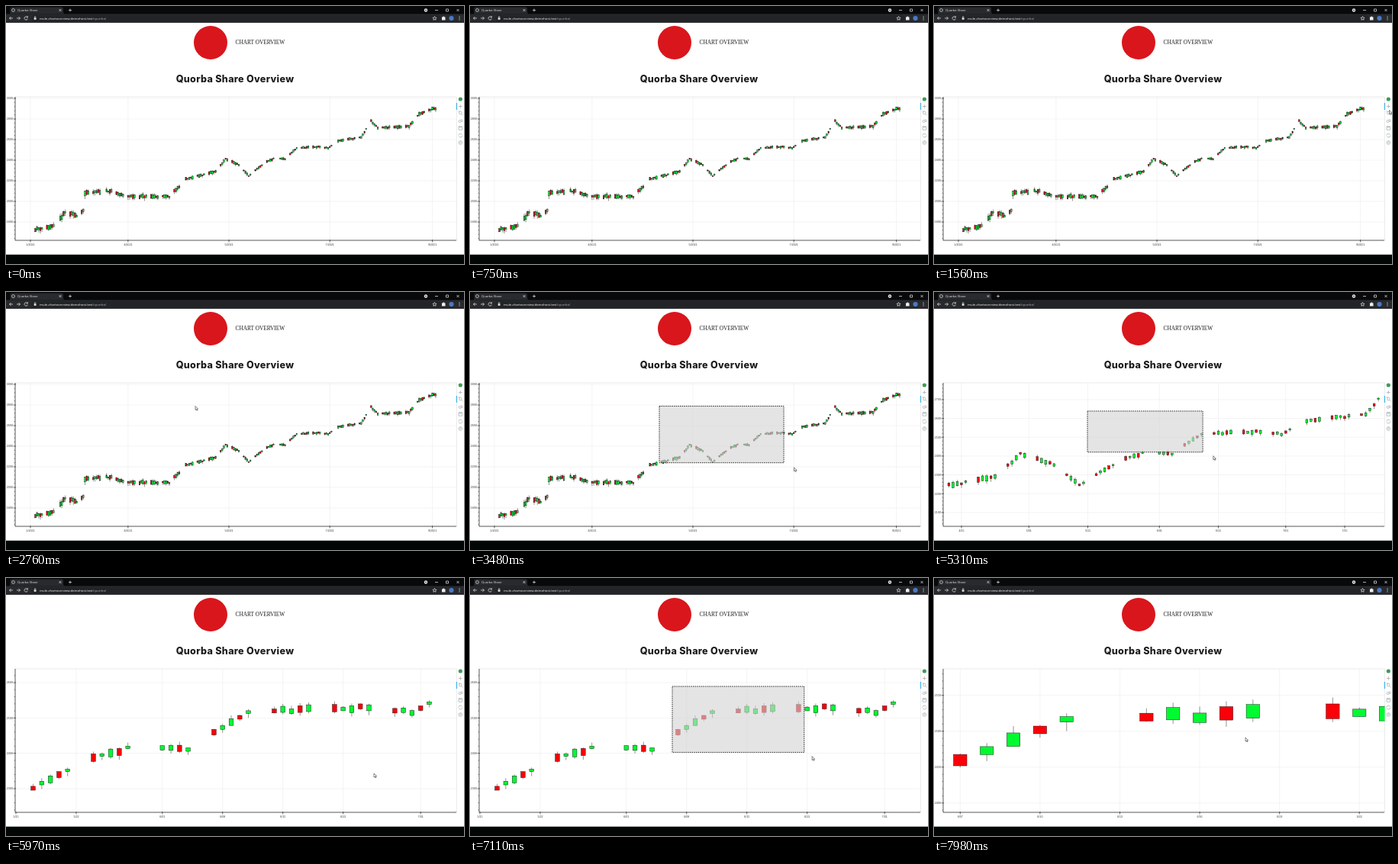
These frames come from a looping animation (600 px wide and 338 px high, 8000 ms). An HTML page:

```html
<!DOCTYPE html>
<html lang="en">
<head>
<meta charset="utf-8">
<title>Quorba Share</title>
<style>
html, body { margin: 0; width: 100%; height: 100%; overflow: hidden; background: #fff; }
svg { display: block; width: 100%; height: 100%; }
text { font-family: "Open Sans", Roboto, sans-serif; }
.tick { font: 3.7px "Liberation Sans", sans-serif; fill: #3c3c3c; }
.ui { fill: none; stroke: #eceef0; stroke-width: .7; }
.tool { fill: none; stroke: #a1a6a9; stroke-width: .7; }
</style>
</head>
<body>
<svg id="stage" viewBox="0 0 600 338">
  <defs><clipPath id="plot"><rect x="12" y="119" width="578.5" height="188"/></clipPath></defs>
  <rect width="600" height="338" fill="#fff"/>
  <rect y="325.700" width="600" height="13" fill="#020706"/>

  <g id="browser">
    <rect width="600" height="22" fill="#08090a"/>
    <path d="M4 10.500Q5.500 10 5.500 8V3.500Q5.500 1.500 7.500 1.500H73Q75 1.500 75 3.500V8Q75 10 77 10.500Z" fill="#292a2d"/>
    <rect y="10.500" width="600" height="11.500" fill="#292a2d"/>
    <rect x="33" y="11.700" width="536" height="8.600" rx="4.300" fill="#232428"/>
    <circle cx="9.500" cy="5.500" r="1.900" class="ui"/>
    <text x="15" y="7" font-size="4.100" fill="#e8eaed">Quorba Share</text>
    <path class="ui" d="M69.500 4l3 3m0-3l-3 3M82 5.500h4m-2-2v4"/>
    <path class="ui" d="M9 16H4.500m2-2l-2 2 2 2M14 16h4.500m-2-2l2 2-2 2M28 14.600A2.200 2.200 0 1 0 28.400 16.600M28.400 13.200v1.800h-1.800"/>
    <rect x="36.700" y="15.500" width="2.800" height="2.300" fill="#eceef0"/>
    <path class="ui" d="M37.300 15.500v-1a.8.8 0 0 1 1.600 0v1"/>
    <text x="44" y="17.600" font-size="4.300" fill="#fff">mule-chartoverview.demohost.test<tspan fill="#a9adb2">/quorba/</tspan></text>
    <circle cx="550" cy="5.500" r="2.200" fill="#e8eaed"/><circle cx="550" cy="5.500" r=".8" fill="#111"/>
    <path class="ui" d="M562 5.500h4M576.500 4h3v3h-3zM590.500 4l3 3m0-3l-3 3"/>
    <path class="ui" d="M561.500 13.600l.8 1.600 1.700.2-1.200 1.200.3 1.700-1.600-.8-1.600.8.3-1.700-1.200-1.200 1.700-.2z"/>
    <path d="M571 14.500h1.300a1 1 0 0 1 2 0h1.200v4H571z" fill="#eceef0"/>
    <circle cx="583.500" cy="16" r="3.100" fill="#4b78c8"/>
    <path d="M594 13.500v1m0 1v1m0 1v1" stroke="#eceef0"/>
  </g>

  <circle cx="268" cy="48" r="22" fill="#d9161b"/>
  <text x="300.500" y="50.400" font-size="7.350" fill="#1c1c1c" style="font-family:'Liberation Serif',serif">CHART OVERVIEW</text>
  <text x="300" y="99.500" font-size="12.600" font-weight="800" letter-spacing=".3" text-anchor="middle" fill="#1c1c1c" style="font-family:Inter,sans-serif">Quorba Share Overview</text>

  <g id="charts"></g>

  <g id="tools">
    <rect id="active" x="590" width="1" height="9" fill="#26aae1"/>
    <circle cx="595.300" cy="122" r="2.600" fill="#3f9a5b"/>
    <path class="tool" d="M592.800 131.500h5m-2.500-2.500v5"/>
    <path class="tool" d="M596.500 141.500l1.700 1.800M592.500 138h2.500"/><circle class="tool" cx="595.300" cy="140" r="1.800"/>
    <circle class="tool" cx="594.500" cy="151" r="1.500"/><path class="tool" d="M595.500 149h2.200v2.500h-1.500"/>
    <path class="tool" d="M593 157.700h4.600v4.600H593zM594.200 157.700v1.500h2v-1.500"/>
    <path class="tool" d="M593 169.500a2.300 2.300 0 0 1 4.500-.8m.2 1a2.300 2.300 0 0 1-4.500.8"/>
    <circle class="tool" cx="595.300" cy="179" r="2.300"/><path class="tool" d="M594.500 178.300q.8-1.200 1.500 0l-.7 1v.9"/>
  </g>

  <rect id="zoom" fill="#d3d3d3" fill-opacity=".6" stroke="#111" stroke-width=".9" stroke-dasharray="1.500 1.200"/>
  <path id="cursor" d="M0 0v5l1.200-1 .8 1.800.9-.4-.8-1.700h1.500z" fill="#fff" stroke="#222" stroke-width=".55"/>
</svg>

<script>
const NS = "http://www.w3.org/2000/svg";
const LEFT = 12, RIGHT = 590, TOP = 119, BOTTOM = 307, LOOP = 8000;
const $ = id => document.getElementById(id);

function add(parent, tag, attrs, text) {
  const el = document.createElementNS(NS, tag);
  for (const k in attrs) el.setAttribute(k, attrs[k]);
  if (text) el.textContent = text;
  parent.appendChild(el);
  return el;
}

let seed = 11;
function rnd() {
  seed = (seed * 16807) % 2147483647;
  return seed / 2147483647;
}

// Value of a polyline of [x, y] points at x.
function along(points, x) {
  const i = Math.max(1, points.findIndex(p => p[0] >= x));
  const [x0, y0] = points[i - 1], [x1, y1] = points[i];
  return y0 + (y1 - y0) * (x - x0) / (x1 - x0);
}

// Days are counted from 1 January 2021.
const dateOf = day => new Date(Date.UTC(2021, 0, 1 + day));
const HOLIDAYS = [0, 17, 45, 91, 150, 185];
const TREND = [
  [3, 1730], [14, 1755], [21, 1890], [29, 1860], [32, 1920], [33, 2075], [47, 2105],
  [57, 2050], [84, 2045], [94, 2215], [112, 2290], [118, 2410], [125, 2365], [132, 2250],
  [143, 2385], [148, 2420], [154, 2410], [161, 2518], [175, 2530], [180, 2515], [186, 2588],
  [200, 2620], [206, 2780], [210, 2710], [229, 2730], [235, 2845], [244, 2905], [246, 2885]
];

// Bars scatter around the trend; swings are smallest in mid-year.
function makeBars() {
  const bars = [];
  for (let day = 3; day <= 245; day++) {
    const weekday = dateOf(day).getUTCDay();
    if (weekday % 6 === 0 || HOLIDAYS.includes(day)) continue;
    const swing = 14 + 20 * Math.cos(Math.PI * day / 330) ** 2;
    const mid = along(TREND, day) + (rnd() - .5) * swing * .6;
    const half = swing * (.2 + .55 * rnd());
    bars.push({
      day, top: mid + half, bottom: mid - half,
      high: mid + half + swing * .7 * rnd(), low: mid - half - swing * rnd(),
      rising: weekday % 3 === 1
    });
  }
  return bars;
}
const bars = makeBars();

// Visible days and prices, price step, and which dates get a tick.
const VIEWS = [
  { days: [-9.23, 257.5], prices: [1622, 3015], step: 200, ticks: (d, m) => d === 1 && m % 2 === 1, years: true },
  { days: [99.65, 204.42], prices: [2026.6, 2789], step: 100, ticks: d => d === 1 || d === 15 },
  { days: [133.91, 185.15], prices: [2233, 2639], step: 100, ticks: d => d % 7 === 1 && d < 29 },
  { days: [156.36, 172.94], prices: [2387, 2587], step: 50, ticks: d => d % 3 === 1 }
];

function buildChart({ days, prices, step, ticks, years }) {
  const g = add($("charts"), "g", {});
  const perDay = (RIGHT - LEFT) / (days[1] - days[0]);
  const perUnit = (BOTTOM - TOP) / (prices[1] - prices[0]);
  const px = d => LEFT + (d - days[0]) * perDay;
  const py = p => BOTTOM - (p - prices[0]) * perUnit;
  const line = (d, stroke, width) => add(g, "path", { d, stroke, "stroke-width": width, fill: "none" });

  line(`M${LEFT} ${TOP}H${RIGHT + .5}V${BOTTOM}`, "#dcdcdc", .6);
  for (let day = Math.max(0, Math.ceil(days[0])); day < days[1]; day++) {
    const date = dateOf(day), d = date.getUTCDate(), m = date.getUTCMonth() + 1;
    if (!ticks(d, m)) continue;
    const x = px(day);
    line(`M${x} ${TOP}V${BOTTOM}`, "#e9e9e9", .5);
    line(`M${x} ${BOTTOM - 1}v3.500`, "#111", .6);
    const label = m + "/" + (years ? 2021 : String(d).padStart(2, "0"));
    add(g, "text", { x, y: 314, class: "tick", "text-anchor": "middle" }, label);
  }

  const minor = step / 5;
  for (let p = Math.ceil(prices[0] / minor) * minor; p <= prices[1]; p += minor) {
    const y = py(p);
    if (p % step) { line(`M${LEFT} ${y}h-1.500`, "#333", .5); continue; }
    line(`M${LEFT} ${y}H${RIGHT}`, "#e9e9e9", .5);
    line(`M${LEFT + 1} ${y}h-3.500`, "#111", .6);
    add(g, "text", { x: 9, y: y + 1.3, class: "tick", "text-anchor": "end" }, String(p));
  }

  const plot = add(g, "g", { "clip-path": "url(#plot)", stroke: "#111", "stroke-width": .45 });
  const width = Math.max(1.6, perDay / 2);
  for (const b of bars) {
    const x = px(b.day);
    if (x < LEFT - width || x > RIGHT + width) continue;
    add(plot, "path", { d: `M${x} ${py(b.high)}V${py(b.low)}` });
    add(plot, "rect", {
      x: x - width / 2, y: py(b.top), width, height: (b.top - b.bottom) * perUnit,
      fill: b.rising ? "#fa0008" : "#00fa30"
    });
  }
  line(`M${LEFT} ${TOP}V${BOTTOM}H${RIGHT}`, "#111", .7);
  return g;
}
const charts = VIEWS.map(buildChart);

// Pointer moves; those with a zoom time drag out a selection box.
const MOVES = [
  { from: 0, to: 0, x: 606, y: 290 },
  { from: 900, to: 1450, x: 596.5, y: 136.5 },
  { from: 1680, to: 1980, x: 347, y: 192 },
  { from: 2190, to: 2750, x: 248, y: 149.5 },
  { from: 2955, to: 3633, x: 475.5, y: 253, zoom: 3930 },
  { from: 3960, to: 4650, x: 201, y: 156 },
  { from: 4830, to: 5650, x: 482, y: 256, zoom: 5700 },
  { from: 6020, to: 6340, x: 265, y: 142 },
  { from: 6400, to: 7130, x: 453, y: 236, zoom: 7680 },
  { from: 7690, to: 7900, x: 408, y: 209 }
];
const LAG = 40, PICK = 1660;

function pointer(t) {
  const i = Math.max(1, MOVES.filter(m => t >= m.from).length - 1);
  const a = MOVES[i - 1], b = MOVES[i];
  const f = Math.min(1, Math.max(0, (t - b.from) / (b.to - b.from)));
  return { x: a.x + (b.x - a.x) * f, y: a.y + (b.y - a.y) * f };
}

function draw(t) {
  const view = MOVES.filter(m => t >= m.zoom).length;
  charts.forEach((c, i) => c.setAttribute("display", i === view ? "inline" : "none"));
  $("active").setAttribute("y", t < PICK ? 127 : 136);

  const tip = pointer(t);
  $("cursor").setAttribute("transform", `translate(${tip.x} ${tip.y})`);

  const i = MOVES.findIndex(m => t > m.from + LAG && t < m.zoom), zoom = $("zoom");
  zoom.setAttribute("display", i < 0 ? "none" : "inline");
  if (i < 0) return;
  const { x, y } = MOVES[i - 1], end = pointer(t - LAG);
  const box = { x, y, width: end.x - x, height: end.y - y };
  for (const k in box) zoom.setAttribute(k, box[k]);
}

function tick() {
  draw(performance.now() % LOOP);
  requestAnimationFrame(tick);
}
tick();
</script>
</body>
</html>
```
